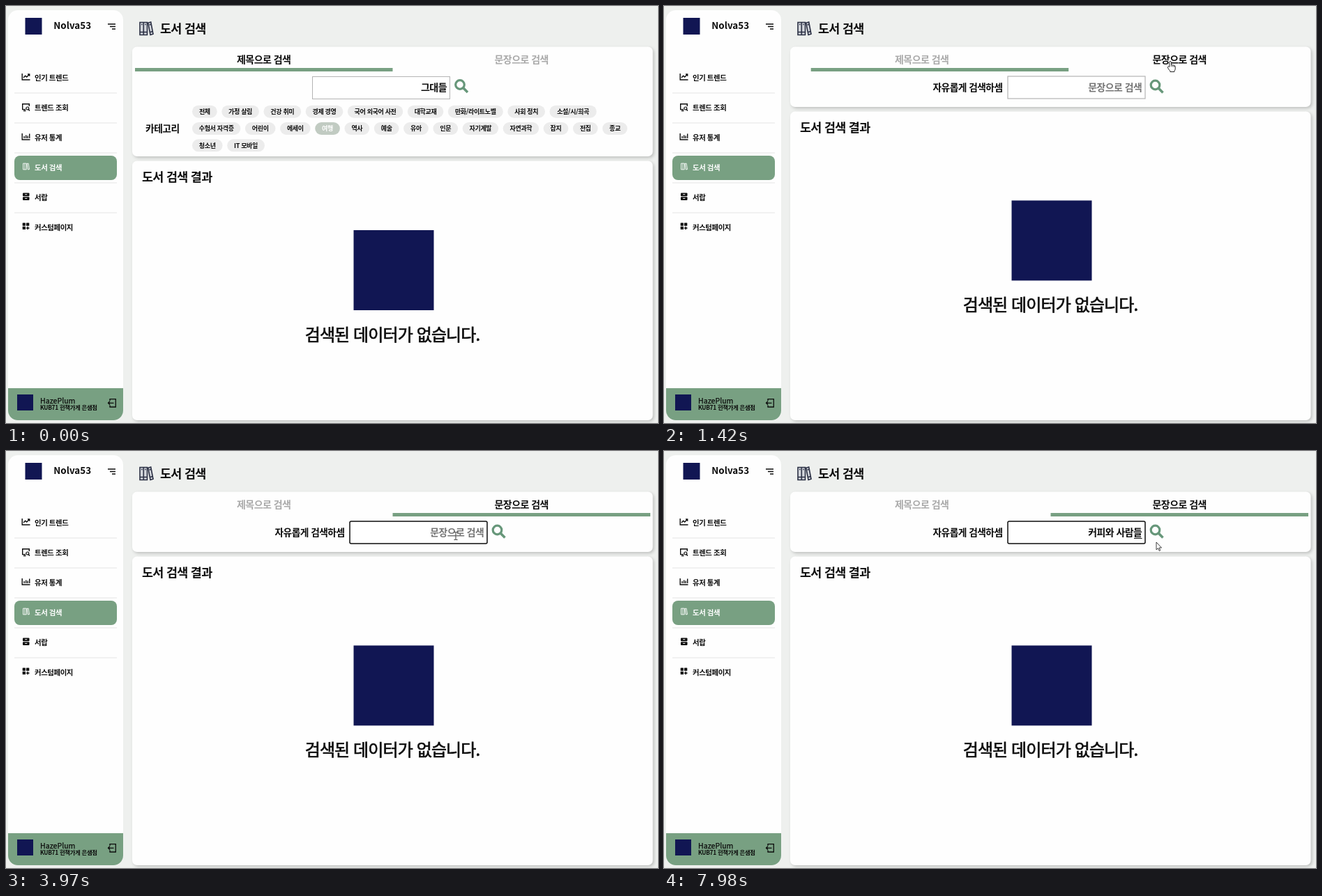
An HTML page that plays this animation: 935 by 599 pixels, repeating every 8 s.

```html
<!DOCTYPE html>
<html lang="ko">
<head>
<meta charset="utf-8">
<title>도서 검색</title>
<style>
html, body { margin: 0; width: 100%; height: 100%; overflow: hidden; background: #eef0ee; }
svg { display: block; width: 935px; height: 599px; }
text { font-family: "Noto Sans CJK KR", "Noto Sans CJK", sans-serif; font-weight: 700; letter-spacing: -.037em; white-space: pre; }
.latin { letter-spacing: 0; }
.user { font-weight: 400; letter-spacing: 0; stroke: #0c0c0c; stroke-width: .25px; }
.message { font-weight: 400; stroke: #0c0c0c; stroke-width: .7px; }
.card { fill: #fefefe; filter: drop-shadow(2px 2px 2px rgba(0, 0, 0, .2)); }
.line { fill: none; stroke-width: 1.4; }
</style>
</head>
<body>
<svg id="stage" viewBox="0 0 935 599"></svg>
<script>
const LOOP = 8000;
const GREEN = '#78a082', NAVY = '#111653', INK = '#0c0c0c', MUTED = '#a9a9a9';
const stage = document.getElementById('stage');

// Text placed by the vertical centre of its glyphs.
const text = (x, cy, size, str, { fill = INK, anchor = 'start', id = '', cls = '' } = {}) =>
  `<text x="${x}" y="${cy + size * .38}" font-size="${size}" fill="${fill}" text-anchor="${anchor}" id="${id}" class="${cls}">${str}</text>`;
const rect = (x, y, w, h, r, fill, extra = '') =>
  `<rect x="${x}" y="${y}" width="${w}" height="${h}" rx="${r}" fill="${fill}" ${extra}/>`;
const at = (x, y, body, extra = '') => `<g transform="translate(${x} ${y})" ${extra}>${body}</g>`;
const line = (d, color = INK, width = 1.4) =>
  `<path class="line" d="${d}" stroke="${color}" style="stroke-width:${width}"/>`;

// Sidebar
const icons = [
  at(22.5, 97, line('M.7 0V9H12M2.5 6L5.2 3.2L7.2 5L11 1.2M8.5 1H11.2V3.7')),
  at(23, 140, line('M5 8.6H.7V.8H10.3V4M2 10.5H5.5') +
    '<circle cx="7.8" cy="7" r="2" fill="none" stroke="#0c0c0c" stroke-width="1.2"/>' + line('M9.2 8.5L11 10.5')),
  at(22.5, 183, line('M.7 0V9H12M3.6 7V4M6.2 7V2.5M8.7 7V3.5M11.2 7V.5')),
  at(24, 225.5, line('M.6 .6H3V9.4H.6ZM3 .6H5.4V9.4H3M6 1L8 .5L9.6 9L7.6 9.5Z', '#fff', .9)),
  at(24, 268.5, rect(0, 0, 9.5, 4.7, 1, INK) + rect(0, 5.7, 9.5, 4.7, 1, INK) +
    line('M3.2 2.2H6.3M3.2 7.9H6.3', '#fff', 1)),
  at(23.7, 311.5, rect(0, 0, 4.3, 4.3, .5, INK) + rect(5.3, 0, 4.3, 4.3, .5, INK) +
    rect(0, 5.3, 4.3, 4.3, .5, INK) + line('M7.5 5.2V9.8M5.2 7.5H9.8'))
];
const menu = ['인기 트렌드', '트렌드 조회', '유저 통계', '도서 검색', '서랍', '커스텀페이지'];

function sidebar() {
  let s = rect(3, 6, 165, 589, 14, '#fefefe');
  s += `<path d="M3 549H168V581a14 14 0 0 1-14 14H17a14 14 0 0 1-14-14Z" fill="${GREEN}"/>`;
  s += rect(27.5, 17, 24, 24, 0, NAVY);
  s += text(68.3, 28, 13.4, 'Nolva53', { cls: 'latin' });
  s += line('M146 26H157M149 29.5H157M152 33H157', INK, 1.5);
  for (let i = 0; i < 5; i++) s += rect(12, 124.5 + i * 43, 147, 1, 0, '#e6e6e6');
  s += rect(12, 215, 147, 35, 8, GREEN);
  menu.forEach((m, i) => {
    s += icons[i] + text(41, 103.5 + i * 42.9, 10.4, m, { fill: i === 3 ? '#fff' : INK });
  });
  s += rect(16, 558, 23, 23, 0, NAVY);
  s += text(49, 566.5, 10.6, 'HazePlum', { cls: 'user' });
  s += text(49, 576.5, 8.4, 'KUB71 헌책가게 은샘점');
  s += line('M149 567V564.7H157.3V576H149V573.5M154.5 570.3H146.5M149 567.8L146.5 570.3L149 572.8', INK, 1.3);
  return s;
}

// Category chips; each width follows from its label.
const chipRows = [
  ['전체', '가정 살림', '건강 취미', '경제 경영', '국어 외국어 사전', '대학교재', '만화/라이트노벨', '사회 정치', '소설/시/희곡'],
  ['수험서 자격증', '어린이', '에세이', '여행', '역사', '예술', '유아', '인문', '자기계발', '자연과학', '잡지', '전집', '종교'],
  ['청소년', 'IT 모바일']
];
const chipWidth = s => [...s].reduce((w, c) => w + (c === ' ' ? 2.2 : c < '가' ? 4 : 7.85), 20);

function chips() {
  let s = '';
  chipRows.forEach((row, r) => {
    let x = 267;
    const y = 142.7 + r * 24.3;
    for (const label of row) {
      const w = chipWidth(label), on = label === '여행';
      s += rect(x, y, w, 18, 9, on ? '#c1cbc2' : '#ececec');
      s += text(x + w / 2, y + 9, 9, label, { anchor: 'middle', fill: on ? '#fff' : INK });
      x += w + 6.6;
    }
  });
  return s;
}

const lens = (x, y) => at(x, y,
  '<circle cx="8" cy="8" r="6.3" fill="none" stroke="#67977a" stroke-width="3.2"/>' + line('M12.8 12.8L19 19', '#67977a', 3.6));

const books = at(191, 22,
  '<path d="M1 1.5H11.5V19.5H1ZM12.7 2.2L16.7 1L20 18.3L16 19.5Z" fill="#d3d6dc"/>' +
  line('M1 1.5H6.3V19.5H1ZM6.3 1.5H11.5V19.5H6.3M1 15.5H11.5M3 4.5H4.6M8.3 4.5H9.8', '#2b3044', 1.6) +
  line('M12.7 2.2L16.7 1L20 18.3L16 19.5ZM15.2 15.8L19.4 14.6M14.6 5L16.4 4.6', '#2b3044', 1.6));

const cursors =
  at(0, 0, `<path d="M-1.2 8V1.2a1.3 1.3 0 0 1 2.6 0V5.2q1.3-.8 2.2.4q1.3-.5 2 .6q1.6-.3 1.6 1.4V10.5q0 2-1.3 3.2V15H-.2V13.8Q-2 12-3.6 9.2Q-4 7.6-2.6 7.4Q-1.8 7.4-1.2 8Z" fill="#fff" stroke="#111" stroke-width=".9"/>` +
    line('M1.4 5.2V7.8M3.6 5.6V8M5.6 6.2V8.2', '#111', .7), 'id="hand"') +
  at(0, 0, '<path d="M0 0V10.8L2.5 8.6L4.2 12.4L5.8 11.7L4.1 8H7.5Z" fill="#fff" stroke="#111" stroke-width=".8"/>', 'id="arrow"') +
  at(0, 0, line('M-2.5-5.5H-.6L0-5L.6-5.5H2.5M0-5V5M-2.5 5.5H-.6L0 5L.6 5.5H2.5', '#333', 1), 'id="beam"');

stage.innerHTML = rect(0, 0, 935, 599, 0, '#eef0ee') + sidebar() + books +
  text(221, 32.5, 17.4, '도서 검색') +
  '<rect id="top" class="card" x="181" y="58.5" width="746.5" rx="7"/>' +
  '<rect id="bottom" class="card" x="181" width="746.5" rx="7"/>' +
  text(369.7, 77, 14, '제목으로 검색', { id: 'tabA', anchor: 'middle' }) +
  text(739.2, 77, 14, '문장으로 검색', { id: 'tabB', anchor: 'middle' }) +
  rect(185, 89, 369.5, 5, 0, GREEN, 'id="bar"') +
  `<g id="byTitle">${rect(439.5, 101.5, 197, 32, 0, '#fff', 'stroke="#b4b4b4"')}
    ${text(632, 117, 14, '그대들', { anchor: 'end' })}${lens(643, 105)}
    ${text(200, 176, 13.8, '카테고리')}${chips()}</g>` +
  `<g id="bySentence">${text(385.5, 117, 13.7, '자유롭게 검색하셈')}
    <rect id="field" x="493" y="101" width="197" height="32" fill="#fff"/>
    ${text(685.3, 117, 13.9, '', { id: 'query', anchor: 'end' })}
    ${rect(674, 125, 11.5, 1, 0, INK, 'id="under"')}${rect(685, 109, 1, 17, 0, INK, 'id="caret"')}
    ${lens(696.5, 105.5)}</g>` +
  text(195, 0, 17.4, '도서 검색 결과', { id: 'heading' }) +
  `<g id="empty">${rect(498.5, 322, 115, 115, 0, NAVY)}
    ${text(554, 471.5, 24, '검색된 데이터가 없습니다.', { anchor: 'middle', cls: 'message' })}</g>` +
  '<circle id="click" r="9" fill="#f4ee3c" fill-opacity=".8"/>' + cursors;

const el = {};
stage.querySelectorAll('[id]').forEach(e => { if (e.id) el[e.id] = e; });
const set = (id, attrs) => { for (const k in attrs) el[id].setAttribute(k, attrs[k]); };
const show = (id, on) => set(id, { visibility: on ? 'visible' : 'hidden' });
const within = (t, a, b) => t >= a && t < b;

const snap = (t, from, step) => from + Math.floor((t - from) / step) * step;

// cubic-bezier(.4, 0, .2, 1)
function ease(p) {
  if (p <= 0) return 0;
  if (p >= 1) return 1;
  let lo = 0, hi = 1, s = .5;
  for (let i = 0; i < 24; i++) {
    s = (lo + hi) / 2;
    const x = 1.2 * s * (1 - s) ** 2 + .6 * s * s * (1 - s) + s ** 3;
    if (x < p) lo = s; else hi = s;
  }
  return s * s * (3 - 2 * s);
}

const path = [
  [200, 907, 588], [410, 838, 350], [620, 755, 135], [760, 728, 82], [830, 726, 79.5],
  [1700, 726, 79.5], [1980, 694.5, 89.5], [2030, 690, 93], [2110, 682, 99], [2380, 645, 122],
  [7640, 645, 122], [7710, 652, 123], [7890, 694, 133], [7980, 706, 131]
];
function pointer(t) {
  let i = 1;
  while (i < path.length - 1 && path[i][0] < t) i++;
  const [a, x, y] = path[i - 1], [b, u, v] = path[i];
  const p = Math.min(1, Math.max(0, (t - a) / (b - a)));
  return [x + (u - x) * p, y + (v - y) * p];
}

const typing = [
  [4450, 'ㅋ'], [4520, '커'], [4790, '커ㅍ'], [4920, '커피'], [5180, '커피ㅇ'], [5280, '커피오'], [5380, '커피와'],
  [5580, '커피와\u00a0'], [5780, '커피와 ㅅ'], [5910, '커피와 사'], [6110, '커피와 사ㄹ'], [6210, '커피와 사라'],
  [6310, '커피와 사람'], [6980, '커피와 사람ㄷ'], [7110, '커피와 사람드'], [7180, '커피와 사람들']
];
const typed = t => typing.reduce((s, [at, str]) => t >= at ? str : s, '');

const CLICK_TAB = 1420, CLICK_FIELD = 2380;

function caretOn(t) {
  if (t < CLICK_FIELD || t >= 7710) return false;
  if (t < 4450) return Math.floor((t - CLICK_FIELD) / 530) % 2 === 0;
  return !within(t, 6910, 6980);
}

function pointerTime(t) {
  if (t < CLICK_TAB) return snap(t, 200, 70);
  if (t < 2030) return snap(t, CLICK_TAB, 70);
  if (t < 2110) return 2030;
  return t < 7000 ? snap(t, 2110, 90) : snap(t, 7710, 90);
}

function draw(t) {
  const second = t >= CLICK_TAB, focus = t >= CLICK_FIELD;
  const top = second ? 151.5 : 222.5;
  set('top', { height: top - 6.5 - 58.5 });
  set('bottom', { y: top, height: 595 - top });
  set('heading', { y: top + 23 + 6.6 });
  set('empty', { transform: `translate(0 ${second ? -42.6 : 0})` });
  set('tabA', { fill: second ? MUTED : INK });
  set('tabB', { fill: second ? INK : MUTED });
  set('bar', { x: 185 + 369.5 * ease((snap(t, CLICK_TAB, 70) - 1374) / 300) });
  set('byTitle', { display: second ? 'none' : 'inline' });
  set('bySentence', { display: second ? 'inline' : 'none' });

  set('field', { stroke: focus ? '#0c0c0c' : '#b4b4b4', 'stroke-width': focus ? 1.5 : 1.2, rx: focus ? 2 : 0 });
  const str = typed(t);
  el.query.textContent = str || '문장으로 검색';
  set('query', { fill: str ? INK : '#757575' });
  set('under', { display: str && !str.endsWith('\u00a0') ? 'inline' : 'none' });
  set('caret', { display: caretOn(t) ? 'inline' : 'none' });

  const [x, y] = pointer(pointerTime(t));
  const kind = t < 200 ? '' : t < 690 || t >= 7890 ? 'arrow' : t < 2110 ? 'hand' : 'beam';
  for (const id of ['arrow', 'hand', 'beam']) {
    show(id, id === kind);
    set(id, { transform: `translate(${x} ${y})` });
  }
  show('click', within(t, 1290, CLICK_TAB) || within(t, CLICK_FIELD, 2510));
  set('click', { cx: x, cy: y });
}

function tick() {
  draw(performance.now() % LOOP);
  requestAnimationFrame(tick);
}
tick();
</script>
</body>
</html>
```
